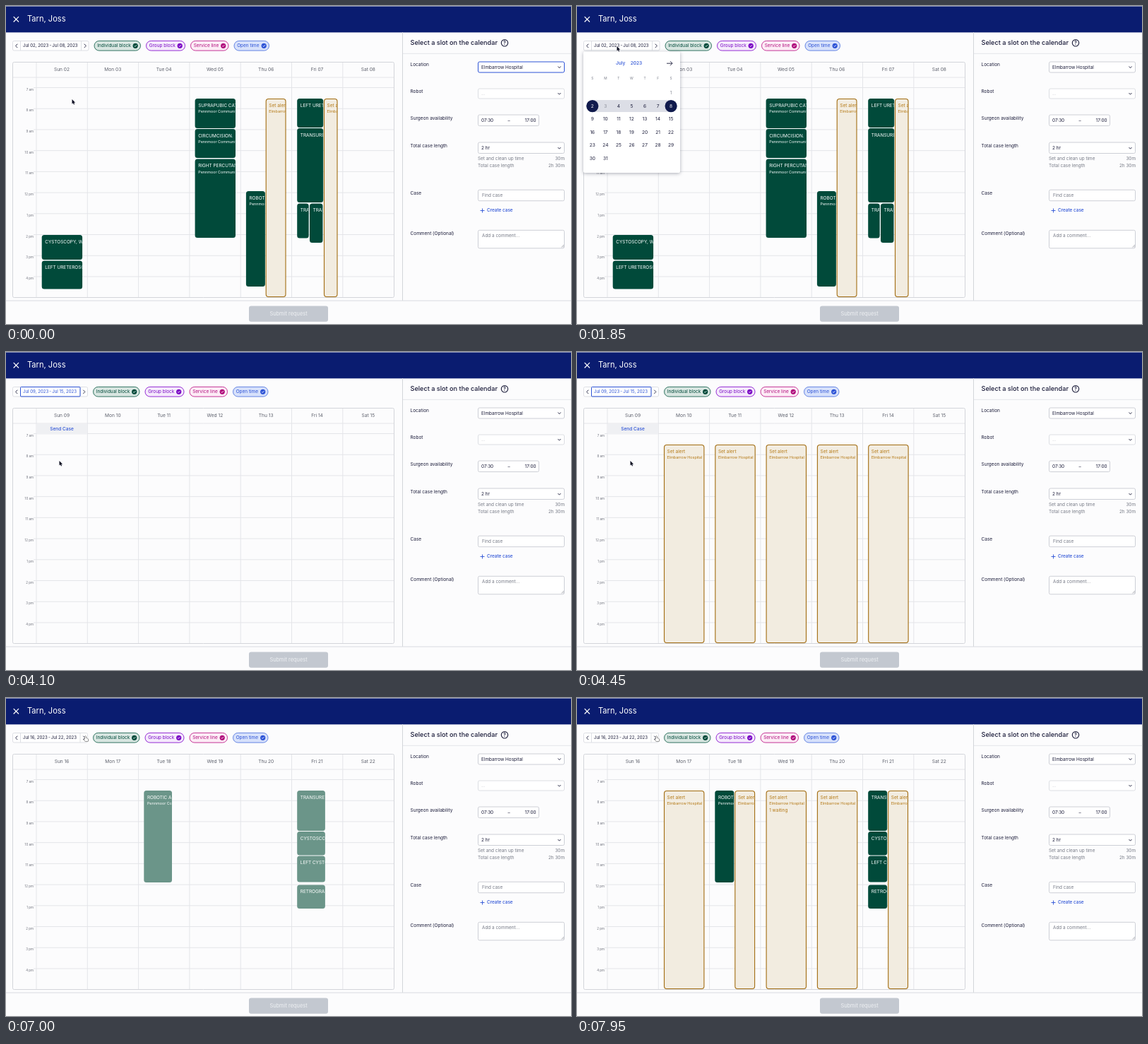
Recreate the animation shown at these times as an HTML page with a canvas. Size 800 by 450 pixels, loop 8 s.

```html
<!DOCTYPE html>
<html lang="en">
<head>
<meta charset="utf-8">
<title>Slot calendar</title>
<style>
  html, body { margin: 0; width: 100%; height: 100%; overflow: hidden; background: #fcfcfd; }
  canvas { display: block; width: 800px; height: 450px; }
</style>
</head>
<body>
<canvas id="stage"></canvas>
<script>
const canvas = document.getElementById('stage');
const ctx = canvas.getContext('2d');
const scale = window.devicePixelRatio || 1;
canvas.width = 800 * scale;
canvas.height = 450 * scale;

const LOOP = 8000;
const INK = '#1b1c3a', GREY = '#777b87', LINE = '#e4e5e9', EDGE = '#cdcfd6';
const BLUE = '#2d53d6', NAVY = '#0a1c70', GREEN = '#014a3a', DIM_GREEN = '#6b9589';
const AMBER = '#a26c10', PAPER = '#fcfcfd';
const HOSPITAL = 'Elmbarrow Hospital', COMMUNITY = 'Pennmoor Community';
const INSET = 7.7, FULL = 57.4;
const columnX = i => 43 + 72.3 * i;

// Moments at which the interface switches state
const BLUR = 1050, POPUP_OPEN = 1150, PICKED = 2700, WEEK2 = 3800, WEEK2_OPEN = 4150;
const NEXT = 5500, WEEK3 = 6600, WEEK3_OPEN = 7350;

// Cursor stops: time, x, y
const CURSOR = [[50, 93.5, 132], [850, 56.5, 57], [1900, 56.5, 57], [2550, 75.5, 154],
                [4550, 75.5, 154], [5300, 112.5, 53.5]];

// Events: column, x offset, y, width, height, title, subtitle
const WEEK1_EVENTS = [
  [0, INSET, 324, FULL, 35, 'CYSTOSCOPY, WITH'],
  [0, INSET, 360.5, FULL, 40, 'LEFT URETEROSCOPY'],
  [3, INSET, 131, FULL, 42, 'SUPRAPUBIC CATHETER', COMMUNITY],
  [3, INSET, 174, FULL, 41, 'CIRCUMCISION.', COMMUNITY],
  [3, INSET, 216.5, FULL, 111.5, 'RIGHT PERCUTANEOUS', COMMUNITY],
  [4, INSET, 262, 27, 135, 'ROBOTIC ASSIST', COMMUNITY],
  [5, INSET, 131, 37, 41, 'LEFT URETEROSCOPY'],
  [5, INSET, 173, 37, 105, 'TRANSURETHRAL'],
  [5, INSET, 279.5, 16.5, 49, 'TRANSURETHRAL'],
  [5, 25.5, 279.5, 18.5, 55.5, 'TRANSURETHRAL']
];
const WEEK3_EVENTS = [
  [2, INSET, 131, 0, 130, 'ROBOTIC ASSIST', COMMUNITY],
  [5, INSET, 131, 0, 57, 'TRANSURETHRAL'],
  [5, INSET, 189, 0, 33.5, 'CYSTOSCOPY'],
  [5, INSET, 223.5, 0, 37, 'LEFT CYSTOSCOPY'],
  [5, INSET, 264.5, 0, 33.5, 'RETROGRADE']
];

function text(value, x, y, size = 6.4, color = INK, align = 'left', weight = 400) {
  ctx.font = `${weight} ${size}px Inter, sans-serif`;
  ctx.fillStyle = color;
  ctx.textAlign = align;
  ctx.textBaseline = 'middle';
  ctx.fillText(value, x, y);
}

function box(x, y, w, h, radius, fill, stroke, width = 1) {
  ctx.beginPath();
  ctx.roundRect(x, y, w, h, radius);
  if (fill) { ctx.fillStyle = fill; ctx.fill(); }
  if (stroke) { ctx.strokeStyle = stroke; ctx.lineWidth = width; ctx.stroke(); }
}

function path(points, color, width = 1) {
  ctx.beginPath();
  points.forEach(([x, y]) => ctx.lineTo(x, y));
  ctx.strokeStyle = color;
  ctx.lineWidth = width;
  ctx.stroke();
}

function circle(x, y, r, fill, stroke, width = 1, from = 0, to = 2 * Math.PI) {
  ctx.beginPath();
  ctx.arc(x, y, r, from, to);
  if (fill) { ctx.fillStyle = fill; ctx.fill(); }
  if (stroke) { ctx.strokeStyle = stroke; ctx.lineWidth = width; ctx.stroke(); }
}

const chevronDown = (x, y, color = INK) =>
  path([[x - 2, y - 1], [x, y + 1.2], [x + 2, y - 1]], color, 0.9);
const chevronSide = (x, y, dir) =>
  path([[x - dir * 1.3, y - 2.7], [x + dir * 1.4, y], [x - dir * 1.3, y + 2.7]], INK, 0.9);

function drawHeader() {
  ctx.fillStyle = NAVY;
  ctx.fillRect(0, 0.5, 800, 36.9);
  path([[10.7, 15.2], [18, 22.5]], '#fff', 1.2);
  path([[18, 15.2], [10.7, 22.5]], '#fff', 1.2);
  text('Tarn, Joss', 30, 19, 11.1, '#fff');
}

function drawSidebar(focused) {
  path([[561.5, 37], [561.5, 417]], '#d3d5da');
  path([[562, 67.3], [800, 67.3]], LINE);
  path([[0, 417], [800, 417]], '#d9dbe0');
  text('Select a slot on the calendar', 572.5, 52, 9.15, INK, 'left', 500);
  circle(706, 52.3, 4.7, null, INK, 1.1);
  text('?', 706, 52.5, 7, INK, 'center', 600);

  [['Location', 83.5], ['Robot', 121], ['Surgeon availability', 158.7], ['Total case length', 198],
   ['Case', 265], ['Comment (Optional)', 322]].forEach(([label, y]) => text(label, 572.5, y, 6.5));

  const field = (y, h, value, color = INK, w = 122, edge = EDGE) => {
    box(668.5, y, w, h, 2, '#fff', edge);
    text(value, 673, y + Math.min(h, 17) / 2 + 0.2, 6.4, color);
  };
  field(79, 15, HOSPITAL, INK, 122, focused ? BLUE : EDGE);
  chevronDown(783.5, 86.5);
  field(117, 14, '...', '#b0b3bc', 122, '#dcdee3');
  chevronDown(783.5, 124);
  field(154, 15.5, '07:30', INK, 86);
  text('–', 712, 161.7, 6.4, INK, 'center');
  text('17:00', 750.5, 161.9, 6.4, INK, 'right');
  field(193, 15.5, '2 hr');
  chevronDown(783.5, 201);
  text('Set and clean up time', 668, 216, 6.4, GREY);
  text('30m', 791, 216, 6.4, GREY, 'right');
  text('Total case length', 668, 225.7, 6.4, GREY);
  text('2h 30m', 791, 225.7, 6.4, GREY, 'right');
  field(260.2, 15.5, '', GREY);
  text('Find case', 674, 268.2, 6.4, GREY);
  path([[671.5, 289.5], [677.5, 289.5]], BLUE, 0.9);
  path([[674.5, 286.5], [674.5, 292.5]], BLUE, 0.9);
  text('Create case', 681, 289.5, 6.4, BLUE, 'left', 500);
  field(317.3, 25.5, '', GREY);
  text('Add a comment…', 674, 325.5, 6.4, GREY);
  path([[786.5, 341.5], [790, 338]], GREY, 0.6);
  path([[788.5, 341.5], [790, 340]], GREY, 0.6);

  box(344, 424.6, 112, 22.2, 3, '#c3c8d0');
  text('Submit request', 400, 436, 7.45, '#eef0f3', 'center');
}

function drawToolbar(from, to, shift, focused) {
  box(9.5, 49.5, 107.5 + shift, 13.5, 2, '#fff', '#dddfe4');
  path([[20.5, 50], [20.5, 63]], '#dddfe4');
  path([[106.5 + shift, 50], [106.5 + shift, 63]], '#dddfe4');
  if (focused) box(20.5, 49.5, 84.5, 13.5, 1, null, BLUE);
  chevronSide(15, 56.4, -1);
  chevronSide(112 + shift, 56.4, 1);
  text(`${from}, 2023\u2009-\u2009${to}, 2023`, 24, 56.5, 6.1, focused ? BLUE : INK);

  [['Individual block', 125, 65.5, '#d8e6e1', '#1c6652', GREEN],
   ['Group block', 198.5, 55, '#f5eafc', '#8a16d0', '#7a08c4'],
   ['Service line', 261.5, 53.5, '#fdecf6', '#c0208c', '#b00c7c'],
   ['Open time', 323, 49.5, '#d7e1fb', '#5579e0', BLUE]].forEach(([name, x, w, fill, edge, ink]) => {
    x += shift;
    box(x, 49.4, w, 13.7, 6.85, fill, edge, 0.9);
    text(name, x + 4.2, 56.5, 6.45, ink);
    const cx = x + w - 7.3;
    circle(cx, 56.3, 3.6, ink);
    path([[cx - 1.6, 56.4], [cx - 0.4, 57.5], [cx + 1.7, 55.1]], '#fff', 0.8);
  });
}

function drawGrid(firstDay) {
  box(9.5, 79.5, 540, 333, 2, PAPER, '#d3d5da');
  path([[10, 101], [549, 101]], LINE);
  ['Sun', 'Mon', 'Tue', 'Wed', 'Thu', 'Fri', 'Sat'].forEach((day, i) => {
    const x = columnX(i);
    path([[x, 80], [x, 412]], LINE);
    text(`${day} ${String(firstDay + i).padStart(2, '0')}`, x + 36, 90, 6.6, '#5d606c', 'center');
  });
  for (let i = 0; i < 10; i++) {
    const y = 115.5 + 29.72 * i, hour = (i + 6) % 12 + 1;
    path([[39, y], [549, y]], LINE);
    text(`${hour} ${i < 5 ? 'am' : 'pm'}`, 39, y + 2.7, 4.5, '#6d707b', 'right');
  }
}

function drawBlock(x, y, w, h, fill, edge, lines) {
  ctx.save();
  if (edge) box(x + 0.5, y + 0.5, w - 1, h - 1, 3.5, fill, edge, 1.1);
  else box(x, y, w, h, 3.5, fill);
  ctx.beginPath();
  ctx.rect(x, y, w - 0.5, h);
  ctx.clip();
  lines.forEach(([value, dy, size, color]) => text(value, x + 4.6, y + dy, size, color));
  ctx.restore();
}

function drawEvent([column, dx, y, width, h, title, subtitle], w = width, fill = GREEN) {
  const lines = [[title, 10, 6.4, '#fff']];
  if (subtitle) lines.push([subtitle, 18.7, 5.45, '#fff']);
  drawBlock(columnX(column) + dx, y, w, h, fill, null, lines);
}

function drawAlert(column, dx = INSET, w = FULL, waiting = false) {
  const lines = [['Set alert', 10, 6.5, '#b57a17'], [HOSPITAL, 18.7, 5.4, '#b57a17']];
  if (waiting) lines.push(['1 waiting', 28, 6.4, '#b57a17']);
  drawBlock(columnX(column) + dx, 131, w, 281, '#f2ece0', AMBER, lines);
}

function drawWeek1() {
  drawToolbar('Jul 02', 'Jul 08', 0, false);
  drawGrid(2);
  WEEK1_EVENTS.forEach(event => drawEvent(event));
  drawAlert(4, 35.5, 28.8);
  drawAlert(5, 45.5, 19.5);
}

function drawWeek2(open) {
  drawToolbar('Jul 09', 'Jul 15', -1.5, true);
  drawGrid(9);
  ctx.fillStyle = '#eff0f3';
  ctx.fillRect(43.5, 101.5, 71.5, 15);
  text('Send Case', 79, 109.5, 6.5, BLUE, 'center', 500);
  if (open) for (let i = 1; i < 6; i++) drawAlert(i);
}

function drawWeek3(open) {
  drawToolbar('Jul 16', 'Jul 22', -1.5, false);
  drawGrid(16);
  WEEK3_EVENTS.forEach(event => drawEvent(event, open ? 27 : 39.7, open ? GREEN : DIM_GREEN));
  if (!open) return;
  [1, 3, 4].forEach(i => drawAlert(i, INSET, FULL, i === 3));
  [2, 5].forEach(i => drawAlert(i, 35.7, 28.8));
}

function drawPopup() {
  ctx.save();
  ctx.shadowColor = 'rgba(20, 25, 50, 0.35)';
  ctx.shadowBlur = 5 * scale;
  ctx.shadowOffsetY = scale;
  box(9, 64.5, 137, 171.5, 2, '#fff');
  ctx.restore();
  text('July', 55, 81.5, 6.6, BLUE, 'left', 500);
  text('2023', 75.7, 81.5, 6.6, BLUE, 'left', 500);
  path([[127, 81.2], [135, 81.2]], INK, 0.9);
  path([[132, 78.2], [135, 81.2], [132, 84.2]], INK, 0.9);

  const dayX = i => 21.8 + 18.55 * i, rowY = i => 123 + 18.55 * i;
  [...'SMTWTFS'].forEach((d, i) => text(d, dayX(i), 102.3, 4.8, GREY, 'center'));
  ctx.fillStyle = '#dcdee6';
  ctx.fillRect(dayX(0), rowY(1) - 8.5, dayX(6) - dayX(0), 17);
  [0, 6].forEach(i => circle(dayX(i), rowY(1), 8.6, '#101a4c'));
  for (let day = 1; day <= 31; day++) {
    const cell = day + 5;
    const color = day === 2 || day === 8 ? '#fff' : day === 1 || day === 3 ? '#8b8e99' : INK;
    text(day, dayX(cell % 7), rowY(Math.floor(cell / 7)) + 0.2, 6.6, color, 'center');
  }
}

function drawSpinner(t) {
  const start = t / 1000 * 2 * Math.PI;
  circle(279.2, 227.2, 5, null, '#cdd6f4', 1.1);
  circle(279.2, 227.2, 5, null, BLUE, 1.2, start, start + Math.PI * 0.8);
}

function cursorAt(t) {
  const next = CURSOR.findIndex(stop => stop[0] > t);
  if (next === 0) return CURSOR[0].slice(1);
  if (next < 0) return CURSOR[CURSOR.length - 1].slice(1);
  const [t0, x0, y0] = CURSOR[next - 1], [t1, x1, y1] = CURSOR[next];
  const p = (t - t0) / (t1 - t0), k = p * p * (3 - 2 * p);
  return [x0 + (x1 - x0) * k, y0 + (y1 - y0) * k];
}

function drawCursor(t) {
  const [x, y] = cursorAt(t);
  const hand = t >= WEEK3;
  const outline = new Path2D(hand
    ? 'M-1 1 Q0 0 .8 1 L1 3.4 L3.3 4 Q4.2 4.3 4 5.5 L3.4 8 H-.3 L-2.3 5.3 Q-2 4.3 -1 5 Z'
    : 'M0 0 V6.6 L1.5 5.2 L2.5 7.5 L3.6 7 L2.6 4.8 H4.6 Z');
  ctx.save();
  ctx.translate(x, y);
  ctx.lineJoin = 'round';
  ctx.strokeStyle = hand ? '#222' : '#fff';
  ctx.lineWidth = 0.9;
  ctx.stroke(outline);
  ctx.fillStyle = hand ? '#fff' : '#0b0d20';
  ctx.fill(outline);
  ctx.restore();
}

function draw(t) {
  ctx.setTransform(scale, 0, 0, scale, 0, 0);
  ctx.fillStyle = PAPER;
  ctx.fillRect(0, 0, 800, 450);
  drawHeader();
  drawSidebar(t < BLUR);
  if (t < PICKED) drawWeek1();
  else if (t < WEEK2 || (t >= NEXT && t < WEEK3)) drawSpinner(t);
  else if (t < NEXT) drawWeek2(t >= WEEK2_OPEN);
  else drawWeek3(t >= WEEK3_OPEN);
  if (t >= POPUP_OPEN && t < PICKED) drawPopup();
  drawCursor(t);
}

function tick() {
  draw(performance.now() % LOOP);
  requestAnimationFrame(tick);
}
tick();
</script>
</body>
</html>
```
